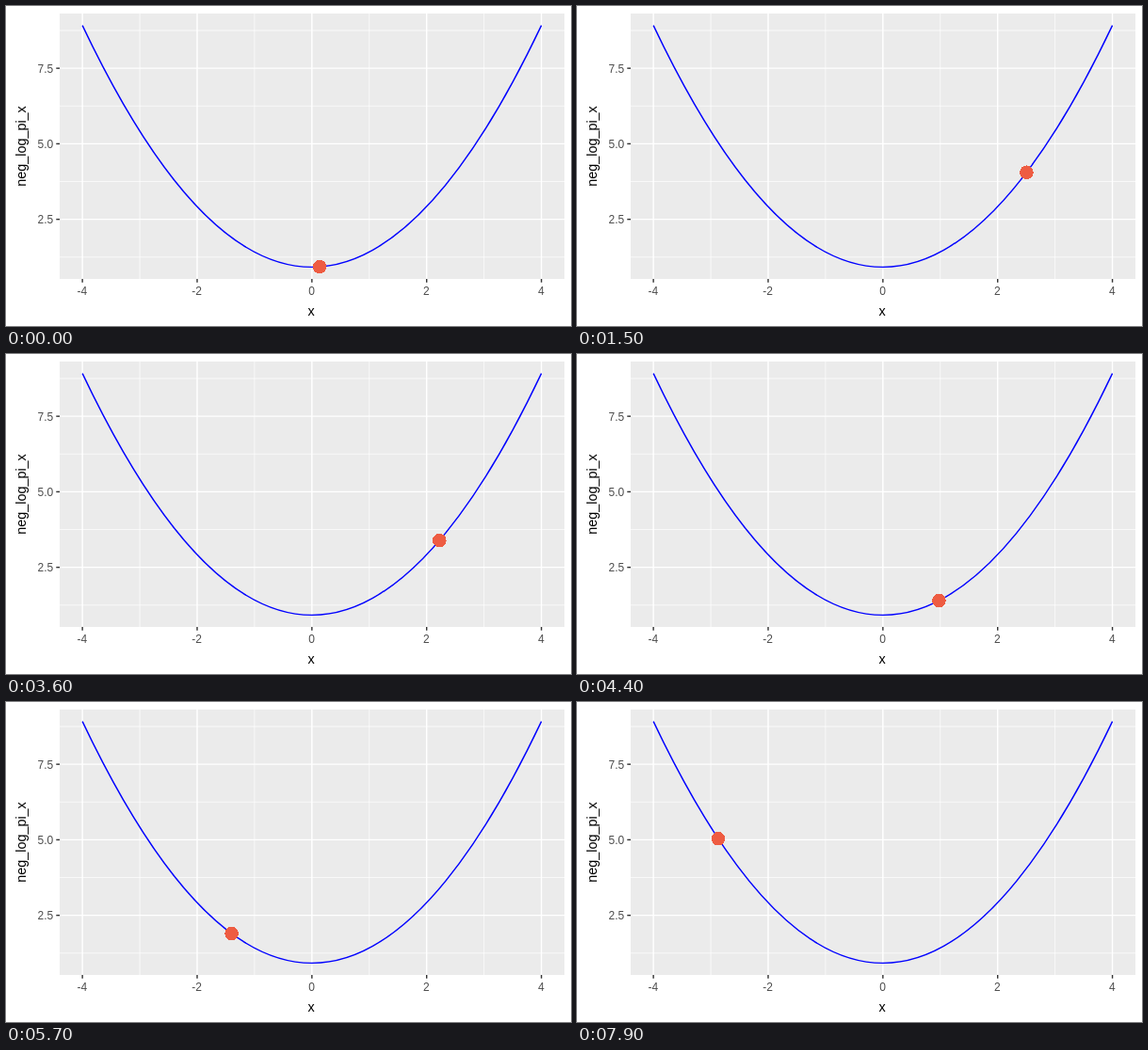
An HTML page for the animation above (8 s loop, 600 by 340 pixels).

```html
<!DOCTYPE html>
<html>
<head>
<meta charset="utf-8">
<style>
  html, body { margin: 0; width: 100%; height: 100%; overflow: hidden; background: #fff; }
  svg { display: block; font-family: "Liberation Sans", Arial, sans-serif; }
  .label { font-size: 12px; fill: #4d4d4d; }
  .title { font-size: 14.4px; text-anchor: middle; }
  .major { stroke: #fff; stroke-width: 1.42; }
  .minor { stroke: #fff; stroke-width: .71; }
  .tick { stroke: #333; stroke-width: 1.42; }
  .curve { fill: none; stroke: #00f; stroke-width: 1.42; }
</style>
</head>
<body>
<svg id="plot" width="600" height="340" viewBox="0 0 600 340">
  <rect x="57" y="8" width="536" height="282" fill="#ebebeb"/>
</svg>
<script>
const LEFT = 57, RIGHT = 593, TOP = 8, BOTTOM = 290;
const BASE = Math.log(2 * Math.PI) / 2;
const STEP = 100, LOOP = 8000;
const plot = document.getElementById('plot');

const px = x => 324.85 + 60.93 * x;
const py = y => 306.9 - 32.1 * y;
const energy = x => x * x / 2 + BASE;

function add(tag, attrs, text = '') {
  const el = document.createElementNS('http://www.w3.org/2000/svg', tag);
  for (const key in attrs) el.setAttribute(key, attrs[key]);
  el.textContent = text;
  return plot.appendChild(el);
}
const line = (kind, x1, y1, x2, y2) => add('line', { class: kind, x1, y1, x2, y2 });
const column = (kind, x) => line(kind, px(x), TOP, px(x), BOTTOM);
const row = (kind, y) => line(kind, LEFT, py(y), RIGHT, py(y));

[-3, -1, 1, 3].forEach(x => column('minor', x));
[1.25, 3.75, 6.25, 8.75].forEach(y => row('minor', y));

for (const x of [-4, -2, 0, 2, 4]) {
  column('major', x);
  line('tick', px(x), BOTTOM, px(x), BOTTOM + 3.7);
  add('text', { class: 'label', x: px(x) - .3, y: 307, 'text-anchor': 'middle' }, x);
}
for (const y of [2.5, 5, 7.5]) {
  row('major', y);
  line('tick', LEFT - 3.7, py(y), LEFT, py(y));
  add('text', { class: 'label', x: 50.3, y: py(y) + 4.4, 'text-anchor': 'end' }, y.toFixed(1));
}
add('text', { class: 'title', x: 324, y: 329 }, 'x');
add('text', { class: 'title', transform: 'translate(21 149) rotate(-90)' }, 'neg_log_pi_x');

// A parabola is exactly one quadratic Bézier segment.
const end = py(energy(4));
add('path', { class: 'curve', d: `M${px(-4)} ${end}Q${px(0)} ${py(BASE - 8)} ${px(4)} ${end}` });

const dot = add('circle', { r: 7.3, fill: '#ee5c42', 'shape-rendering': 'crispEdges' });

function draw(now) {
  const step = Math.floor(now % LOOP / STEP);
  const x = 3 * Math.sin(.045 + step * Math.PI / 50);
  dot.setAttribute('cx', px(x));
  dot.setAttribute('cy', py(energy(x)));
}
const start = performance.now();
function tick() {
  draw(performance.now() - start);
  requestAnimationFrame(tick);
}
tick();
</script>
</body>
</html>
```
